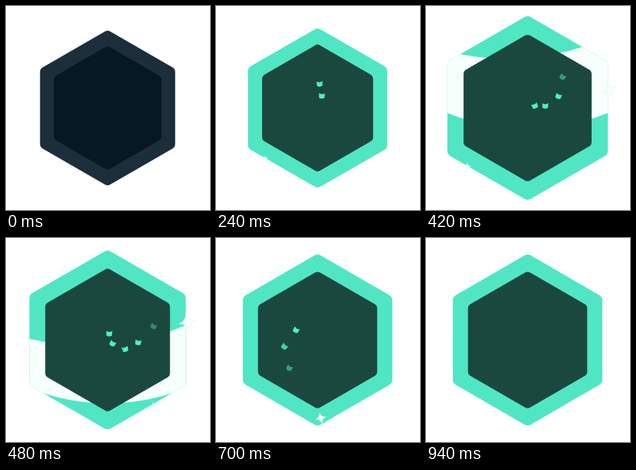
Animation of 256x256 px, one loop 0.98 s. Source, as an HTML page with a canvas:

```html
<!DOCTYPE html>
<html lang="en">
<head>
<meta charset="utf-8">
<title>Hexagon unlock</title>
<style>
  html, body { margin: 0; width: 100%; height: 100%; overflow: hidden; background: #fff; }
  canvas { display: block; width: 256px; height: 256px; }
</style>
</head>
<body>
<canvas id="stage"></canvas>
<script>
const LOOP = 980, SIZE = 256, CX = 127.5, CY = 128, TAU = Math.PI * 2;
const MINT = '#50e6c4', PAPER = '#4ff0bb', GLOW = '#f6fffc';
const canvas = document.getElementById('stage');
const ctx = canvas.getContext('2d');
const ratio = window.devicePixelRatio || 1;
canvas.width = canvas.height = SIZE * ratio;

const clamp = v => Math.max(0, Math.min(1, v));
const lerp = (a, b, u) => a + (b - a) * u;
const swing = (t, t0, t1) => (1 - Math.cos(Math.PI * clamp((t - t0) / (t1 - t0)))) / 2;
const mix = (a, b, u) => `rgb(${a.map((v, i) => Math.round(lerp(v, b[i], u)))})`;
const polar = (a, r) => [Math.cos(a) * r, Math.sin(a) * r];

let seed = 7;
const random = () => (seed = seed * 16807 % 2147483647) / 2147483647;

// Dip, pop past the final size, then settle
const widthAt = t =>
  84.5 - 3.5 * swing(t, 0, 185) + 21 * swing(t, 185, 340) - 8.5 * swing(t, 340, 625);

// The emitter turns clockwise from straight up while it throws pieces
const confetti = Array.from({ length: 11 }, (_, i) => ({
  birth: 180 + i * 42,
  life: 180 + random() * 50,
  angle: -Math.PI / 2 + i * .48,
  speed: .27 + random() * .07,
  tilt: random() - .5
}));

// Sparkles on the rim
const sparkles = [
  { peak: 340, angle: 2.37, size: 12 },
  { peak: 460, angle: -.22, size: 14 },
  { peak: 590, angle: -2.1, size: 21 },
  { peak: 570, angle: .96, size: 17 },
  { peak: 690, angle: 1.53, size: 8 }
];

function hexagon(half) {
  const r = half / Math.cos(Math.PI / 6);
  const point = i => [CX + r * Math.sin(i * TAU / 6), CY - r * Math.cos(i * TAU / 6)];
  ctx.beginPath();
  ctx.moveTo(CX + half, CY);
  for (let i = 2; i < 8; i++) ctx.arcTo(...point(i), ...point(i + 1), half * .08);
  ctx.closePath();
}

// Band of light, bounded by two sagging curves
function shine(t) {
  const low = 61 + (t - 340) * .89;
  const high = 116 + (t - 480) * 1.15;
  if (low < high - 14) return;
  ctx.beginPath();
  ctx.moveTo(24, low);
  ctx.quadraticCurveTo(CX, low + 42, 231, low);
  ctx.lineTo(231, high - 10);
  ctx.quadraticCurveTo(130, high + 35, 24, high + 8);
  ctx.closePath();
  ctx.fillStyle = GLOW;
  ctx.fill();
}

function sparkle(t, half, { peak, angle, size }) {
  const r = size * (1 - Math.abs(t - peak) / 150);
  if (r <= 0) return;
  const [x, y] = polar(angle, half * 1.05);
  ctx.save();
  ctx.translate(CX + x, CY + y);
  ctx.rotate(-.25 + (t - peak) * .002);
  ctx.beginPath();
  ctx.moveTo(r, 0);
  for (let i = 1; i < 5; i++) {
    const a = i * TAU / 4;
    ctx.quadraticCurveTo(...polar(a - TAU / 8, r * .15), ...polar(a, r));
  }
  ctx.fillStyle = GLOW;
  ctx.fill();
  ctx.globalAlpha = .2;
  ctx.lineWidth = .5;
  ctx.strokeStyle = MINT;
  ctx.stroke();
  ctx.restore();
}

function flake(t, { birth, life, angle, speed, tilt }) {
  const age = t - birth;
  if (age < 0 || age > life) return;
  const [x, y] = polar(angle, speed * age);
  ctx.save();
  ctx.translate(130 + x, 118 + y);
  ctx.rotate(tilt + age * .002);
  ctx.globalAlpha = clamp((life - age) / 80);
  ctx.beginPath();
  ctx.moveTo(-3.8, -3.2);
  ctx.quadraticCurveTo(0, -.8, 3.8, -3.2);
  ctx.lineTo(3.4, 2.4);
  ctx.quadraticCurveTo(0, 4.6, -3.4, 2.6);
  ctx.closePath();
  ctx.fillStyle = PAPER;
  ctx.fill();
  ctx.restore();
}

function draw(t) {
  const half = widthAt(t), lit = clamp((t - 10) / 190);
  ctx.setTransform(ratio, 0, 0, ratio, 0, 0);
  ctx.fillStyle = '#fff';
  ctx.fillRect(0, 0, SIZE, SIZE);

  hexagon(half + .3);
  ctx.fillStyle = mix([27, 46, 57], [80, 230, 196], lit);
  ctx.fill();
  ctx.save();
  ctx.clip();
  shine(t);
  ctx.restore();
  sparkles.forEach(s => sparkle(t, half, s));

  hexagon(half * .8);
  ctx.fillStyle = mix([6, 24, 36], [27, 72, 62], lit);
  ctx.fill();
  confetti.forEach(c => flake(t, c));
}

const start = performance.now();
function tick() {
  draw((performance.now() - start) % LOOP);
  requestAnimationFrame(tick);
}
tick();
</script>
</body>
</html>
```
